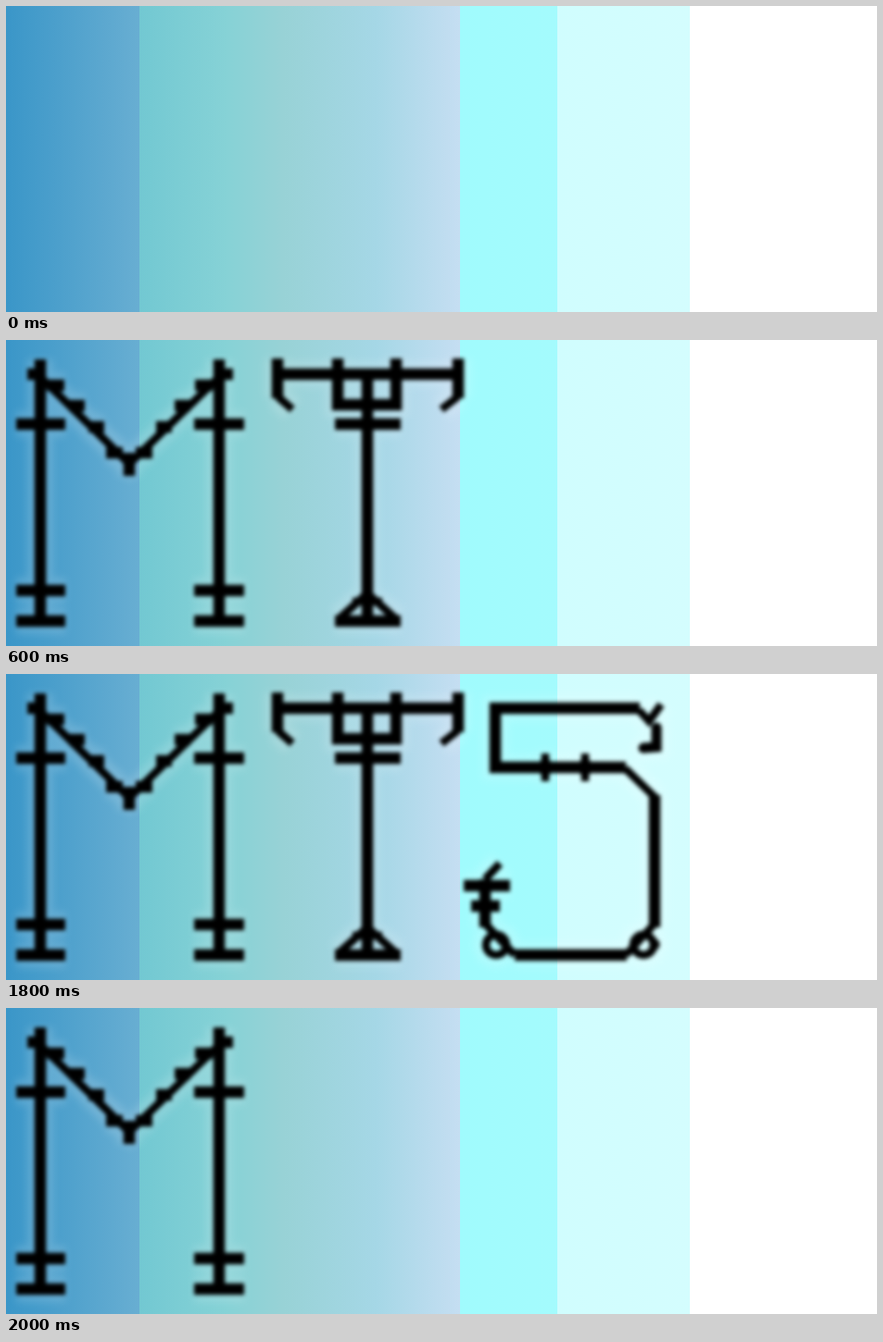
Animation of 940x331 px, one loop 2100 ms. Source, as an HTML page:

```html
<!DOCTYPE html>
<html lang="en">
<head>
<meta charset="utf-8">
<title>Lettering</title>
<style>
  html, body { margin: 0; width: 100%; height: 100%; overflow: hidden; }
  body {
    background: linear-gradient(90deg,
      #3a96c8 0, #68aed2 144px, #72c8d2 144px, #86d2d6 238px,
      #98d2d6 300px, #a5d7e6 400px, #c5def2 490px,
      #a0fbfd 490px, #a4fbfd 595px, #d0fdfe 595px, #d4fdfe 738px,
      #fff 738px) 0 0 / 940px 100% no-repeat #fff;
  }
  svg { display: block; width: 100%; height: 100%; }
  path, circle { fill: none; stroke: #000; stroke-width: 12.5; }
  .ink { filter: blur(2.3px); }
  .thin { stroke-width: 8.5; }
  .dot { stroke-linecap: round; stroke-width: 11; }
  .halo { filter: blur(4px); opacity: .15; }
  .halo path, .halo circle { stroke: #fff; stroke-width: 27; }
</style>
</head>
<body>
<svg viewBox="0 0 940 331" preserveAspectRatio="none" role="img">
  <g class="letter">
    <path d="M37 21V306M230 21V306
      M11 91h53M11 271h53M11 304h53M203 91h54M203 271h54M203 304h54"/>
    <path class="thin" d="M37 40L133 134L230 40"/>
    <path d="M23 37h14M230 37h15
      M44 49h19M68 71h17M89 94h17M108 122h18M140 122h18M162 94h17M182 71h17M204 49h19M133 122v25"/>
  </g>
  <g class="letter">
    <path d="M290 37H492M293 20V63M488 20V63M358 20V70H421V20M355 91h71M390 37V304M355 304h71"/>
    <path class="thin" d="M293 61L309 75M488 61L470 75M390 274L359 302M390 274L421 302M374 283h32"/>
  </g>
  <g class="letter">
    <path d="M684 37H528V101H669M700 131V274M670 304H549M517 222V274M494 229h50M502 251h31"/>
    <path class="thin" d="M668 102L701 134M582 86v30M625 86v30M517 222L533 205M683 39L694 51L707 33
      M517 270L549 304M700 270L669 304"/>
    <path class="dot" d="M582 96v10M625 96v10M702 58V79L688 80M700 292v1"/>
    <circle class="thin" cx="529" cy="293" r="11"/>
    <circle class="thin" cx="688" cy="293" r="11"/>
  </g>
  <g class="letter">
    <path d="M753 32V320M892 20V308M739 283h29M877 58h30"/>
    <path class="thin" d="M753 36L892 304"/>
    <path d="M760 43L886 295" stroke-dasharray="14 10.3"/>
    <path class="dot" d="M757 46l4 8M884 289l4 8M731 304h.1M775 304h.1M870 37h.1M914 37h.1"/>
  </g>
</svg>
<script>
  const LOOP = 2100;
  const spans = [[500, 2100], [600, 2000], [700, 1900], [800, 1800]];
  const letters = [...document.querySelectorAll('.letter')];

  // Each letter is a soft black drawing over a faint glow of the same strokes.
  for (const letter of letters) {
    const ink = letter.innerHTML;
    letter.innerHTML = `<g class="halo">${ink}</g><g class="ink">${ink}</g>`;
  }

  function draw(now) {
    const time = now % LOOP;
    letters.forEach((letter, i) => {
      const [from, to] = spans[i];
      letter.style.display = time >= from && time < to ? '' : 'none';
    });
  }

  const start = performance.now();
  function tick() {
    draw(performance.now() - start);
    requestAnimationFrame(tick);
  }
  tick();
</script>
</body>
</html>
```
